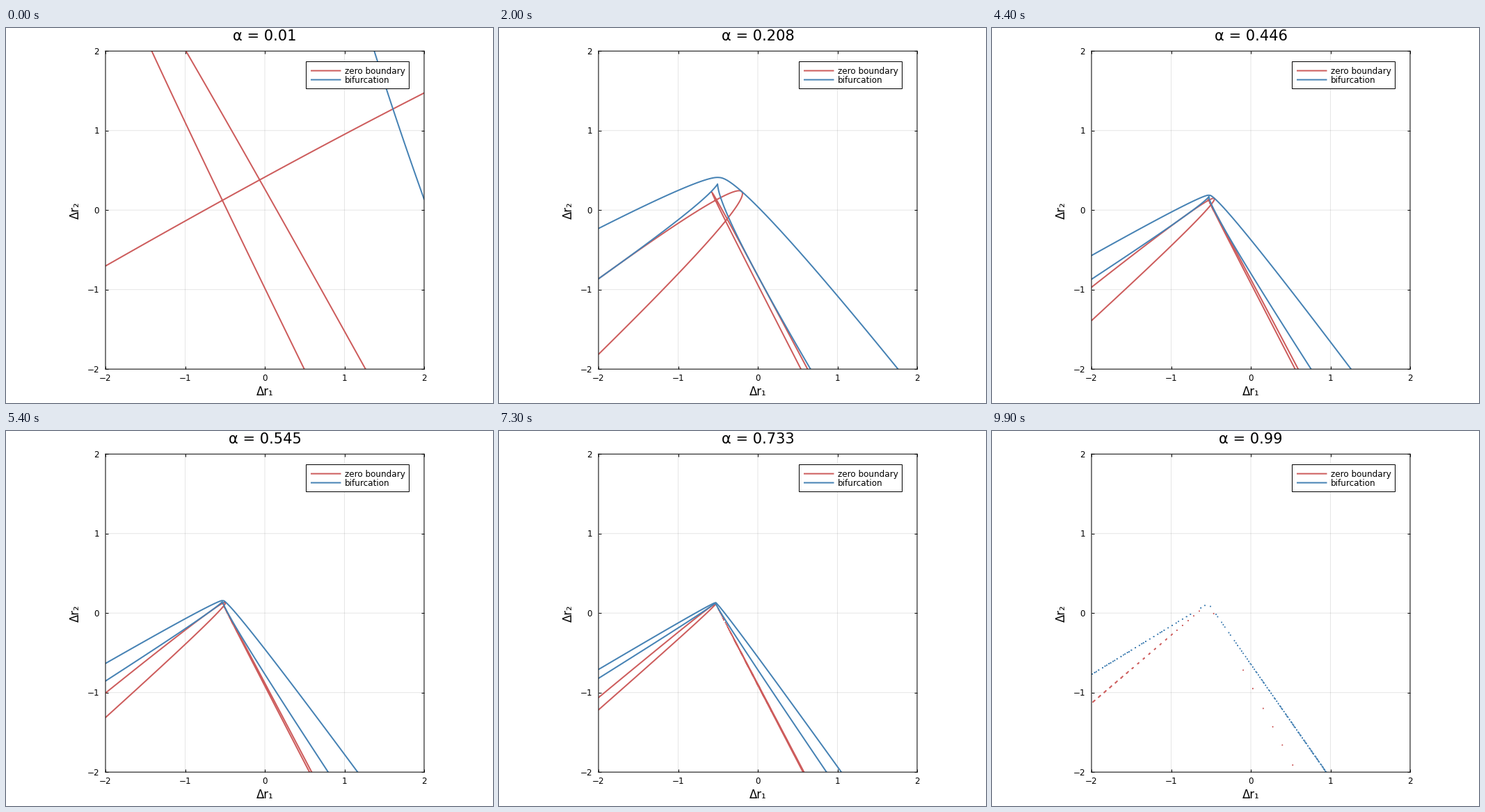
Animation of 700x540 px, one loop 10 s. Source, as a matplotlib script:

```python
import numpy as np
import matplotlib.pyplot as plt
from matplotlib.animation import FuncAnimation
from matplotlib.collections import LineCollection
from matplotlib.patches import Rectangle

W, H, DPI = 700, 540, 100
PX = 72 / DPI  # points per pixel
FRAMES, INTERVAL = 100, 100
LEFT, RIGHT, TOP, BOTTOM = 143, 601, 33.2, 491.2
RED, BLUE = "indianred", "steelblue"

# Quadratic map: tip + a1*u + a2*v + k*(b1*u^2 + c*u*v + b2*v^2)
TIP = (-0.5325, 0.1223)
A1, A2 = (1, 0.553), (1, -2.085)
B1, B2 = (-2.217, -1.897), (15.04, -28.86)
C = (10.41, -2.765)

ALPHAS = np.linspace(0.01, 0.99, FRAMES)
grid = np.linspace(-2, 2, 400)
X, Y = np.meshgrid(grid, grid)


def cross(p, q):
    return p[0] * q[1] - p[1] * q[0]


def parabola(d, a, b):
    """Zero on the curve a*t + b*t^2."""
    return cross(d, b) ** 2 + cross(d, a) * cross(a, b)


def pencil():
    """Fixed parts p, q of det(M1 + s*M2) = p(s) - (d1 + s*d2) * q(s)."""
    b1, b2, a1, a2, c = (np.poly1d(v[::-1]) for v in (B1, B2, A1, A2, C))
    q = b1 * b2 - c * c * 0.25
    p = (c * a1 * a2 - b1 * a2 * a2 - b2 * a1 * a1) * 0.25
    return p, q


P, Q = pencil()


def discriminant(d):
    """Zero where two solutions of the quadratic system merge."""
    d1, d2 = d
    k3 = P[3] - d2 * Q[2]
    k2 = P[2] - d1 * Q[2] - d2 * Q[1]
    k1 = P[1] - d1 * Q[1] - d2 * Q[0]
    k0 = P[0] - d1 * Q[0]
    return (18 * k3 * k2 * k1 * k0 - 4 * k2**3 * k0 + (k2 * k1) ** 2
            - 4 * k3 * k1**3 - 27 * (k3 * k0) ** 2)


plt.rcParams["font.family"] = "DejaVu Sans"
plt.rcParams["path.snap"] = False
fig = plt.figure(figsize=(W / DPI, H / DPI), dpi=DPI, facecolor="white")

ax = fig.add_axes([LEFT / W, 1 - BOTTOM / H, (RIGHT - LEFT) / W, (BOTTOM - TOP) / H])
ax.set(xlim=(-2, 2), ylim=(-2, 2), xticks=range(-2, 3), yticks=range(-2, 3))
ax.tick_params(direction="in", length=4 * PX, width=PX, top=True, right=True,
               labelbottom=False, labelleft=False)
ax.grid(color="black", alpha=0.1, linewidth=PX)
ax.set_axisbelow(True)
for spine in ax.spines.values():
    spine.set_linewidth(PX)

# Overlay in pixel coordinates, origin at the top left
page = fig.add_axes([0, 0, 1, 1], zorder=5)
page.set(xlim=(0, W), ylim=(H, 0))
page.axis("off")


def label(x, y, text, size, ha="center", **kw):
    return page.text(x, y, text, fontsize=size * PX, ha=ha, va="baseline", **kw)


mid_x, mid_y = (LEFT + RIGHT) / 2, (TOP + BOTTOM) / 2
for i in range(-2, 3):
    text = str(i).replace("-", "\u2212")
    label(mid_x + i * (RIGHT - LEFT) / 4, 508, text, 12)
    label(134, mid_y - i * (BOTTOM - TOP) / 4 + 4.4, text, 12, "right")

title = label(mid_x, 18, "", 21)
label(mid_x, 528.8, "Δr₁", 16.5)
label(105, mid_y, "Δr₂", 16.5, rotation=90, rotation_mode="anchor")

page.add_patch(Rectangle((431.5, 48.5), 148, 39, fc="white", ec="black", lw=PX))
for y, color, text in ((61.5, RED, "zero boundary"), (74.5, BLUE, "bifurcation")):
    page.plot([438, 481.5], [y, y], color=color, lw=2 * PX, solid_capstyle="butt")
    label(487, y + 4.4, text, 12, "left")

red, blue = (ax.add_collection(LineCollection([], colors=c, linewidths=2 * PX, zorder=2,
                                              capstyle="round", joinstyle="round"))
             for c in (RED, BLUE))


def zero_lines(z):
    """Zero level as open polylines, so that tiny loops stay solid dots."""
    level = ax.contour(X, Y, z, levels=[0])
    lines = level.allsegs[0]
    level.remove()
    return lines


def draw(frame):
    alpha = ALPHAS[frame]
    k = alpha / (1 - alpha) ** 2
    d = k * (X - TIP[0]), k * (Y - TIP[1])
    red.set_segments(zero_lines(parabola(d, A1, B1) * parabola(d, A2, B2)))
    blue.set_segments(zero_lines(discriminant(d)))
    title.set_text(f"α = {round(float(alpha), 3)}")
    return red, blue, title


anim = FuncAnimation(fig, draw, frames=FRAMES, interval=INTERVAL,
                     init_func=lambda: [], repeat=True, repeat_delay=0)
plt.show()
```
